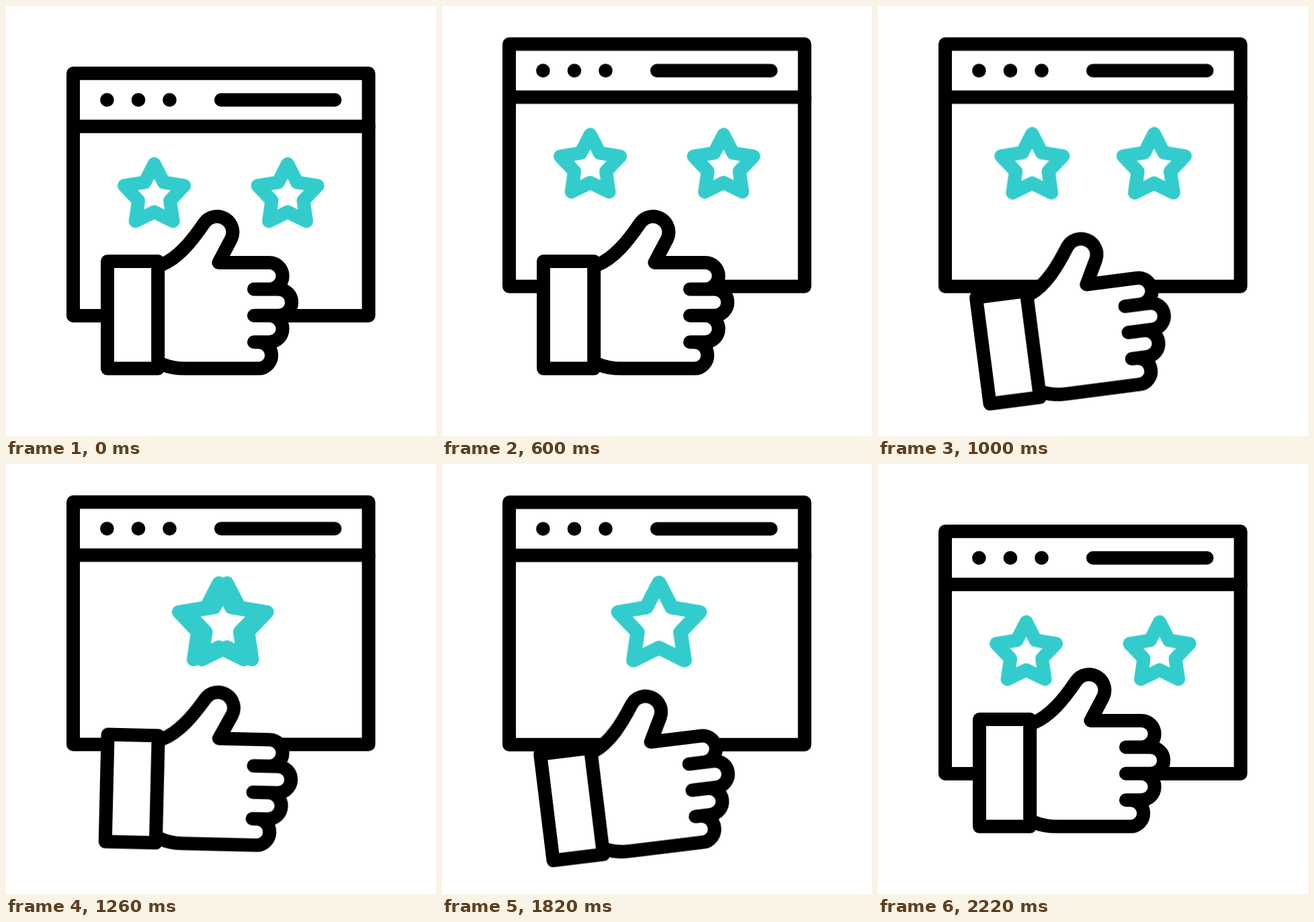
An HTML page without scripts for the animation above (2400 ms loop, 640 by 640 pixels).

```html
<!DOCTYPE html>
<html lang="en">
<head>
<meta charset="utf-8">
<title>Thumbs up</title>
<style>
  html, body { margin: 0; width: 100%; height: 100%; overflow: hidden; background: #fff; }
  svg { display: block; width: 640px; height: 640px; }

  .line {
    fill: #fff;
    stroke: #000;
    stroke-width: 20;
    stroke-linecap: round;
    stroke-linejoin: round;
  }
  .star { fill: none; stroke: #3cc; }

  .window, .star, .lift, .tilt {
    animation: 2.4s cubic-bezier(.37, 0, .63, 1) infinite;
  }
  .window { animation-name: window; }
  .star { animation-name: merge; }
  .lift { animation-name: lift; }
  .tilt { animation-name: tilt; transform-origin: 354px 427px; }

  @keyframes window {
    0%, 8.333%, 91.667%, 100% { transform: translateY(0); }
    25%, 75% { transform: translateY(-43.6px); }
  }
  /* The stroke thins as the star grows, so its drawn width stays at 20. */
  @keyframes merge {
    0%, 38.54%, 91.667%, 100% { transform: translateX(0) scale(1); stroke-width: 20px; }
    55.21%, 75% { transform: translateX(var(--dx)) scale(1.36); stroke-width: 14.7px; }
  }
  @keyframes lift {
    0%, 8.333%, 25%, 89.17%, 100% { transform: translate(0, 0); }
    16.667% { transform: translate(0, -30.6px); }
    38.54%, 74.58% { transform: translate(-.6px, 27.4px); }
  }
  @keyframes tilt {
    0%, 25%, 92.5%, 100% { transform: rotate(0deg); }
    40%, 77.92% { transform: rotate(-7.6deg); }
    62.5% { transform: rotate(7.6deg); }
  }
</style>
</head>
<body>
<svg viewBox="0 0 640 640">
  <defs>
    <path id="star" d="M0-42.6 14-15.4 44.6-10.4 23.5 11.8 28 42.6 0 28.7-28 42.6-23.5 11.8-44.6-10.4-14-15.4Z"/>
  </defs>

  <g class="window line">
    <rect x="100" y="100.3" width="439.7" height="360.7"/>
    <path d="M100 179.2H540M320 139.8H489.5"/>
    <g fill="#000" stroke="none">
      <circle cx="150.4" cy="139.8" r="10.3"/>
      <circle cx="197" cy="139.8" r="10.3"/>
      <circle cx="243.5" cy="139.8" r="10.3"/>
    </g>
    <g transform="translate(220.6 277.7)">
      <use href="#star" class="star" style="--dx: 102.2px"/>
    </g>
    <g transform="translate(419.1 277.7)">
      <use href="#star" class="star" style="--dx: -96px"/>
    </g>
  </g>

  <g class="lift">
    <g class="tilt line">
      <path d="M232 385C256 375 276 351 295 323A23.4 23.4 0 0 1 335 347L316.5 382H392a19.7 19.7 0 0 1 0 39.4H369h36.5a19.7 19.7 0 0 1 0 39.4H369h23a19.7 19.7 0 0 1 0 39.4H369h6.5a19.7 19.7 0 0 1 0 39.4H267C253 539.6 241 537 232 533"/>
      <rect x="151" y="380" width="75.2" height="159.6"/>
    </g>
  </g>
</svg>
</body>
</html>
```
